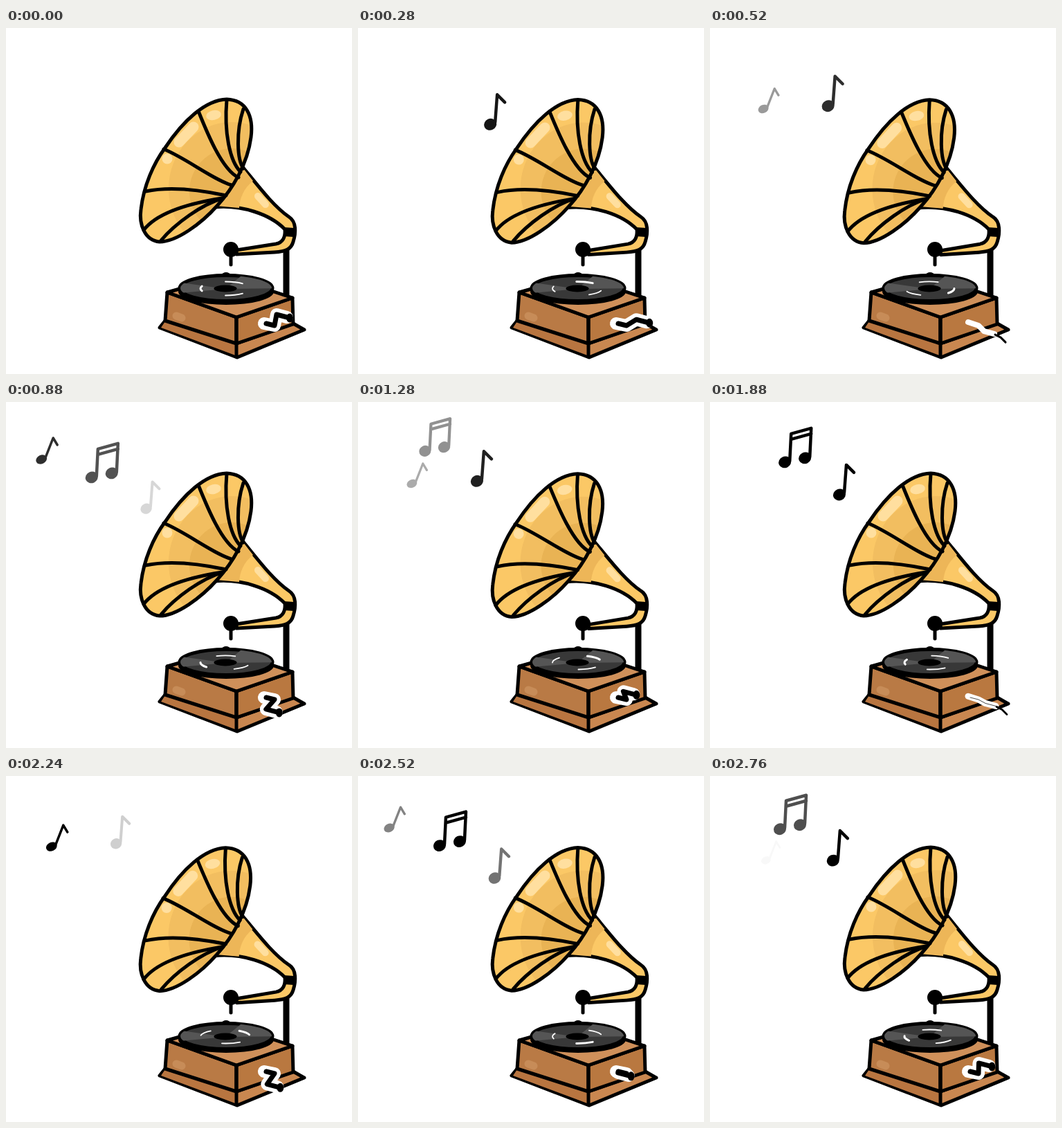
An HTML page that plays this animation: 500 by 500 pixels, repeating every 2800 ms.

```html
<!DOCTYPE html>
<html lang="en">
<head>
<meta charset="utf-8">
<title>Gramophone</title>
<style>
html, body { margin: 0; width: 100%; height: 100%; overflow: hidden; background: #fff; }
svg { display: block; width: 100%; height: 100%; }
.ln { fill: none; stroke: #000; stroke-width: 5; stroke-linecap: round; stroke-linejoin: round; }
.ink { stroke: #000; stroke-width: 5; stroke-linejoin: round; }
.note { stroke: #000; stroke-linecap: round; stroke-linejoin: round; }
.note path { fill: none; }
.wh { fill: none; stroke: #fff; stroke-linecap: round; stroke-linejoin: round; }
</style>
</head>
<body>
<svg viewBox="0 0 500 500">
  <defs>
    <path id="rim" d="M319 103C347 104 358 127 354 158C349 196 328 232 305 257C282 283 246 309 222 309C200 307 192 283 195 262C199 228 213 196 230 173C256 134 288 104 319 103Z"/>
    <clipPath id="mouth"><use href="#rim"/></clipPath>
    <clipPath id="disc"><ellipse cx="318" cy="376" rx="66" ry="18"/></clipPath>
  </defs>

  <!-- box -->
  <path class="ink" fill="#c98750" d="M230 423L222 433L334 476L431 436L415 427L333 456Z"/>
  <path fill="#b87540" d="M230 424L224 433L334 474V456Z"/>
  <path class="ink" fill="#b97a45" d="M233 382L230 423L333 456V418Z"/>
  <path class="ink" fill="#b97840" d="M333 418L414 390L415 428L333 456Z"/>
  <path class="ink" fill="#cf905a" d="M233 382L318 358L414 390L333 418Z"/>
  <path class="ln" d="M333 418V475"/>
  <path d="M246 416L254 419" fill="none" stroke="#c78c58" stroke-width="11" stroke-linecap="round"/>

  <!-- pillar and record -->
  <path d="M405 316V387" stroke="#000" stroke-width="9"/>
  <ellipse cx="318" cy="381" rx="69" ry="19"/>
  <ellipse cx="318" cy="357" rx="6" ry="4"/>
  <ellipse class="ink" cx="318" cy="376" rx="67" ry="18.5" fill="#383838"/>
  <g clip-path="url(#disc)">
    <path d="M317 377L240 366V384ZM317 377L350 350H395V376Z" fill="#555"/>
  </g>
  <ellipse cx="317" cy="376.500" rx="16.500" ry="5"/>
  <g id="shine"></g>

  <!-- crank -->
  <path id="halo" class="wh"/>
  <path id="rod" class="ln"/>
  <ellipse id="knob"/>
  <path id="tip" class="ln"/>

  <!-- horn -->
  <g id="horn">
    <path class="ink" fill="#fbc866" d="M343 202C365 229 387 258 409 273C420 280 419 296 415 309C412 320 404 323 388 324L333 327V321L390 312C400 310 404 302 403 291C382 269 340 255 300 259Z"/>
    <path fill="#edb658" d="M343 203L357 221C343 232 338 246 337 260L303 257Z"/>
    <path d="M364 243L375 255" stroke="#ffdf9f" stroke-width="10" stroke-linecap="round"/>
    <path d="M402 288L417 289L416 302L402 301Z"/>
    <use href="#rim" fill="#fbc866"/>
    <g clip-path="url(#mouth)">
      <ellipse cx="326" cy="232" rx="91" ry="96" fill="#f2be60"/>
      <ellipse cx="326" cy="236" rx="61" ry="62" fill="#e9b354"/>
      <path d="M250 165L271 143" stroke="#ffdf9f" stroke-width="15" stroke-linecap="round"/>
      <ellipse cx="300" cy="126" rx="11" ry="7" fill="#ffdf9f" transform="rotate(-12 300 126)"/>
      <circle cx="233" cy="189" r="7.500" fill="#ffdf9f"/>
    </g>
    <g class="ln">
      <use href="#rim"/>
      <path d="M278 120C290 150 312 205 336 216"/>
      <path d="M319 104C315 150 323 192 339 208"/>
      <path d="M343 117C332 150 334 190 343 203"/>
      <path d="M228 175C260 188 299 219 326 227"/>
      <path d="M202 236C240 228 290 236 318 242"/>
      <path d="M199 292C222 262 280 251 312 246"/>
      <path d="M224 307C245 282 283 255 313 246"/>
    </g>
  </g>
  <circle cx="325" cy="320" r="11"/>
  <path class="ln" d="M325 328V342"/>

  <!-- notes, each with its first head at 0,0 -->
  <g id="small" class="note" stroke-width="3.500">
    <ellipse rx="6.500" ry="4.500" transform="rotate(-25)"/>
    <path d="M6 -3L17 -31L23 -21"/>
  </g>
  <g id="pair" class="note" stroke-width="4.500">
    <ellipse rx="7" ry="6" transform="rotate(-25)"/>
    <ellipse cx="29" cy="-6" rx="7" ry="6" transform="rotate(-25 29 -6)"/>
    <path d="M7 -2L9 -41L38 -49L36 -8M9 -33L38 -41"/>
  </g>
  <g id="single" class="note" stroke-width="4.500">
    <ellipse rx="7" ry="6" transform="rotate(-25)"/>
    <path d="M7 -3L10 -43L21 -32"/>
  </g>
</svg>
<script>
const LOOP = 2800, TURN = 1400, SPIN = LOOP / 3, BEAT = 775, LIFE = 670;
const $ = id => document.getElementById(id);
const clamp = v => Math.max(0, Math.min(1, v));
const mix = (a, b, k) => a + (b - a) * k;
const set = (el, attrs) => { for (const k in attrs) el.setAttribute(k, attrs[k]); };

const notes = [
  { el: $('small'), start: 430, from: [81, 122], to: [39, 67] },
  { el: $('pair'), start: 725, from: [131, 119], to: [92, 64] },
  { el: $('single'), start: 70, from: [204, 156], to: [157, 95] }
];

// Light streaks on the record: centre angle, half length, width
const streaks = [[180, 20, 3], [292, 22, 1.8], [68, 22, 1.8]].map(([mid, half, width]) => {
  const el = document.createElementNS('http://www.w3.org/2000/svg', 'path');
  set(el, { class: 'wh', 'stroke-width': width });
  $('shine').append(el);
  return { el, mid, half };
});

function drawNote({ el, start, from, to }, t) {
  const age = t < start ? -1 : (t - start) % BEAT;
  if (age < 0 || age > LIFE) return set(el, { opacity: 0 });
  const p = age / LIFE;
  const k = mix(p, p * p * (3 - 2 * p), .5);
  const seen = Math.min(clamp(age / 230), clamp((LIFE - age) / 270));
  const x = mix(from[0], to[0], k), y = mix(from[1], to[1], k);
  set(el, {
    opacity: seen,
    transform: `translate(${x} ${y}) scale(${mix(.87, 1, clamp(seen * 1.5))})`
  });
}

function drawCrank(t) {
  const a = t / TURN * 2 * Math.PI, c = Math.cos(a), s = Math.sin(a);
  const deg = (t / TURN * 360) % 360;
  const open = clamp((Math.abs(deg - 132) - 4) / 45), flat = 1 - open;
  const ex = 388 + 3 * c + 14 * s, ey = 430 - 16 * c - 4 * s;
  const hx = ex + 19, hy = ey + 5;
  const stem = `M376 427L388 430L${ex} ${ey}`;
  set($('halo'), {
    d: `M373 ${mix(425, 427, open)}L388 430L${ex} ${ey}L${ex + 15} ${ey + 4}`,
    'stroke-width': mix(8, 18, open)
  });
  set($('rod'), { d: `${stem}L${hx} ${hy}`, style: `stroke-width:${7 * open}`, opacity: open > 0 ? 1 : 0 });
  set($('knob'), { cx: hx, cy: hy, rx: 5 * open, ry: 6.5 * open });
  set($('tip'), {
    d: `M${ex + 16} ${ey + 5}L${ex + 24} ${ey + 9}L${ex + 31} ${ey + 16}`,
    style: `stroke-width:${3 * flat}`,
    opacity: flat > 0 ? 1 : 0
  });
}

function drawShine(t) {
  const at = d => {
    const r = d * Math.PI / 180;
    return `${317 + 36 * Math.cos(r)} ${376.5 + 10 * Math.sin(r)}`;
  };
  for (const { el, mid, half } of streaks) {
    const d = mid + t / SPIN * 360;
    set(el, { d: `M${at(d - half)}A36 10 0 0 1 ${at(d + half)}` });
  }
}

function draw(t) {
  const sway = (1 - Math.cos(t / SPIN * 2 * Math.PI)) * .28;
  set($('horn'), { transform: `rotate(${-sway} 408 292)` });
  drawShine(t);
  drawCrank(t);
  notes.forEach(n => drawNote(n, t));
}

const begin = performance.now();
function tick() {
  const t = (performance.now() - begin) % LOOP;
  draw(Math.floor(t / 40) * 40);
  requestAnimationFrame(tick);
}
draw(0);
requestAnimationFrame(tick);
</script>
</body>
</html>
```
